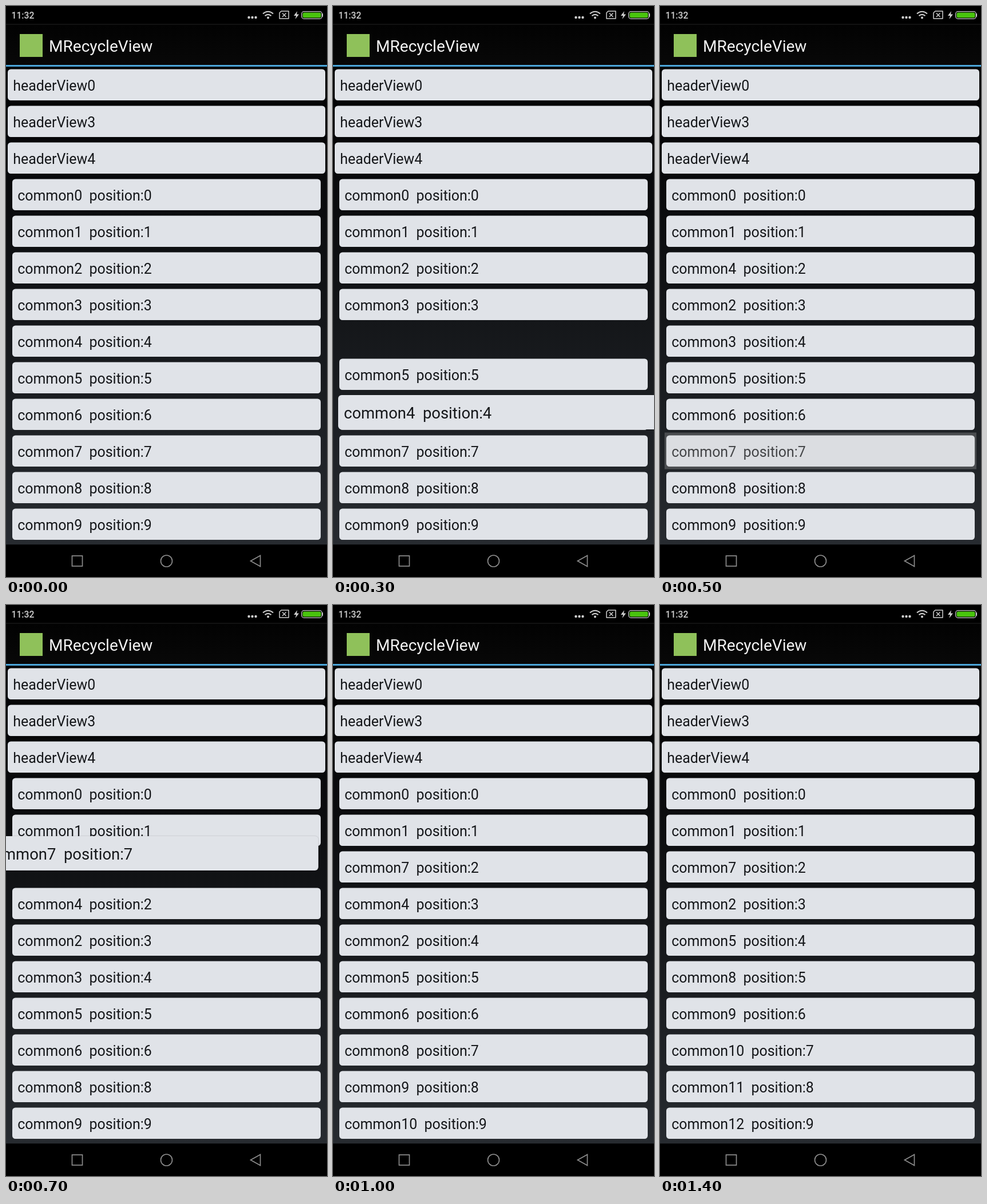
Write an HTML page that moves like this. It is 561x998 px and loops after 1.5 s.

```html
<!DOCTYPE html>
<html lang="en">
<head>
<meta charset="utf-8">
<title>MRecycleView</title>
<style>
  html, body { margin: 0; width: 100%; height: 100%; overflow: hidden; background: #000; }
  svg { display: block; width: 100vw; height: 100vh; }
  text { font-family: Roboto, "Noto Sans", sans-serif; white-space: pre; }
  .card rect { fill: #e0e3e8; }
  .card text { font-size: 24.93px; fill: #15171a; }
  .lifted { filter: drop-shadow(0 0 1px rgba(0, 0, 0, .2)); }
  .press { fill: #ccc; opacity: .25; }
  .nav { fill: none; stroke: #8c8c8c; stroke-width: 1.7; }
</style>
</head>
<body>
<svg viewBox="0 0 561 998" preserveAspectRatio="none">
  <defs>
    <linearGradient id="bg" x1="0" y1="0" x2="0" y2="1">
      <stop offset="0" stop-color="#020203"/>
      <stop offset=".3" stop-color="#0b0c0e"/>
      <stop offset="1" stop-color="#272b30"/>
    </linearGradient>
    <linearGradient id="bar" x1="0" y1="0" x2="0" y2="1">
      <stop offset="0" stop-color="#020202"/>
      <stop offset="1" stop-color="#080808"/>
    </linearGradient>
  </defs>

  <rect width="561" height="998"/>
  <rect y="104" width="561" height="837.5" fill="url(#bg)"/>
  <g id="list"></g>

  <rect y="32" width="561" height="71" fill="url(#bar)"/>
  <rect y="31.5" width="561" height="1" fill="#222"/>
  <rect y="103" width="561" height="3" fill="#4ba6da"/>
  <rect x="24" y="49" width="40" height="40" fill="#8fc15a"/>
  <text x="75" y="80" font-size="28.05" fill="#f3f3f3">MRecycleView</text>

  <text x="9.5" y="21.8" font-size="15.7" font-weight="500" fill="#cfcfcf">11:32</text>
  <g fill="#d0d0d0">
    <circle cx="424.5" cy="20" r="2.2"/>
    <circle cx="430.5" cy="20" r="2.2"/>
    <circle cx="436.5" cy="20" r="2.2"/>
    <circle cx="458" cy="20.5" r="2"/>
    <path d="M509 9 L503 17 H507 L505.500 23 L512 14.500 H508 Z"/>
    <rect x="552" y="13" width="2" height="6" rx="1"/>
  </g>
  <g fill="none" stroke="#d0d0d0" stroke-width="2">
    <path d="M449 13.500 Q458 6 467 13.500 M452.500 17.200 Q458 12.500 463.500 17.200"/>
    <path d="M481 9 H494 V22 H478 V12 Z" stroke-width="1.5" stroke-linejoin="round"/>
    <path d="M483 12.500 L489.500 19 M489.500 12.500 L483 19" stroke-width="1.5"/>
  </g>
  <rect x="516.7" y="9.7" width="35.6" height="12.600" rx="4" fill="#000" stroke="#c8c8c8" stroke-width="1.3"/>
  <rect x="518.500" y="11.500" width="32" height="9" rx="2.500" fill="#49c40d"/>

  <rect y="941.500" width="561" height="56.500"/>
  <g class="nav">
    <rect x="115.500" y="961" width="18" height="18"/>
    <circle cx="280.500" cy="970" r="10"/>
    <path d="M427.500 970 L444.500 960.500 V979.500 Z"/>
  </g>
</svg>
<script>
const NS = "http://www.w3.org/2000/svg";
const LOOP = 1500, TOP = 302.5, STEP = 64, LEFT = 11, WIDE = 539;
const list = document.getElementById("list");

const start = [0, 1, 2, 3, 4, 5, 6, 7, 8, 9, 10, 11, 12];
const move = (rows, from, to) => {
  const out = rows.slice();
  out.splice(to, 0, ...out.splice(from, 1));
  return out;
};
const drop = (rows, i) => rows.filter((_, k) => k !== i);

const raised = move(start, 4, 2);
const mixed = move(raised, 7, 2);
const no3 = drop(mixed, 5);
const no6 = drop(no3, 6);
const no4 = drop(no6, 3);

// rows: order on screen, names: order used for the position labels,
// lift: [slot, x, y], swipe / nudge: [slot, offset], press: slot
const steps = [
  { at: 0, rows: start },
  { at: 200, rows: start, press: 4 },
  { at: 300, rows: start, lift: [4, 9, 680], nudge: [5, -6] },
  { at: 400, rows: raised, names: start, lift: [2, 2, 446] },
  { at: 500, rows: raised, press: 7 },
  { at: 600, rows: move(raised, 7, 4), names: raised, lift: [4, -30, 580] },
  { at: 700, rows: mixed, names: raised, lift: [2, -47, 404] },
  { at: 800, rows: mixed },
  { at: 900, rows: mixed, swipe: [5, -498] },
  { at: 1000, rows: no3 },
  { at: 1100, rows: no3, swipe: [6, -300] },
  { at: 1200, rows: no6 },
  { at: 1300, rows: no6, swipe: [3, -300] },
  { at: 1400, rows: no4 }
];

function add(parent, tag, attrs) {
  const el = document.createElementNS(NS, tag);
  for (const key in attrs) el.setAttribute(key, attrs[key]);
  return parent.appendChild(el);
}

function card(x, y, width, label, scale = 1) {
  const g = add(list, "g", {
    class: scale > 1 ? "card lifted" : "card",
    transform: `translate(${x} ${y}) scale(${scale})`
  });
  add(g, "rect", { width, height: 54.5, rx: 5.5 });
  add(g, "text", { x: 9.2, y: 37.5 }).textContent = label;
}

function draw({ rows, names = rows, lift, swipe, nudge, press }) {
  list.replaceChildren();
  [0, 3, 4].forEach((n, i) => card(3, 110.5 + i * STEP, 555, "headerView" + n));
  const label = id => `common${id}  position:${names.indexOf(id)}`;
  rows.slice(0, 10).forEach((id, i) => {
    if (lift && lift[0] === i) return;
    const dx = swipe && swipe[0] === i ? swipe[1] : 0;
    const dy = nudge && nudge[0] === i ? nudge[1] : 0;
    card(LEFT + dx, TOP + i * STEP + dy, WIDE, label(id));
  });
  if (press !== undefined)
    add(list, "rect", { class: "press", x: 8, y: TOP + press * STEP - 5, width: 545, height: 64 });
  if (lift) card(lift[1], lift[2], WIDE, label(rows[lift[0]]), 1.1);
}

let shown;
const begin = performance.now();
function tick() {
  const t = (performance.now() - begin) % LOOP;
  const now = steps.findLast(s => s.at <= t);
  if (now !== shown) draw(shown = now);
  requestAnimationFrame(tick);
}
tick();
</script>
</body>
</html>
```
